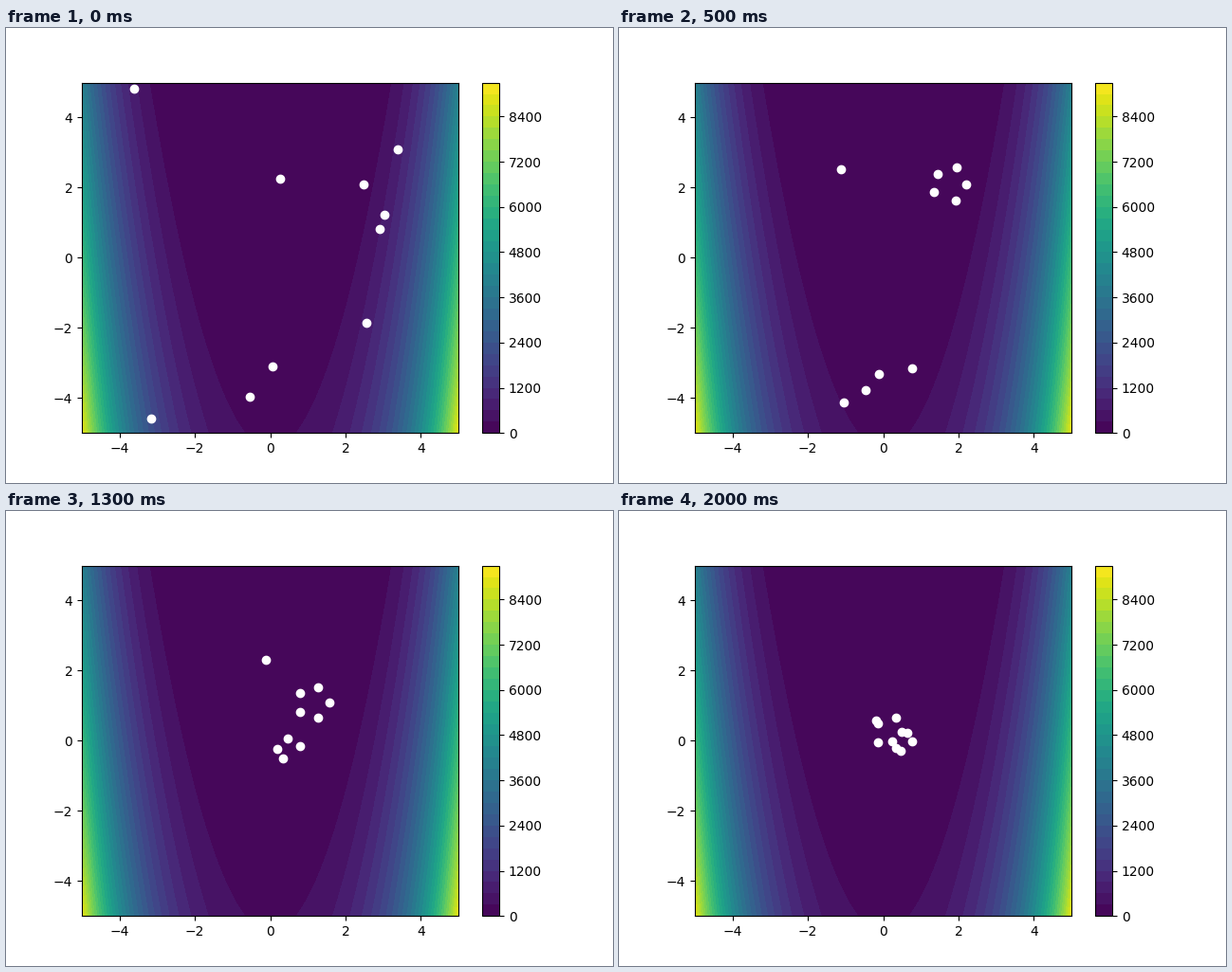
These frames come from a looping animation (640 by 480 pixels, 2.1 s). A matplotlib script:

```python
import numpy as np
import matplotlib.pyplot as plt
from matplotlib.animation import FuncAnimation
from matplotlib.transforms import IdentityTransform

FRAMES, INTERVAL = 21, 100
HEIGHT = 480
KEYS = np.array([0, 3, 7, 10, 13, 17, 20])


def glide(t, values):
    """Smooth cubic path through values at KEYS."""
    slopes = np.gradient(values, KEYS)
    k = min(np.searchsorted(KEYS, t, side="right") - 1, len(KEYS) - 2)
    h = KEYS[k + 1] - KEYS[k]
    u = (t - KEYS[k]) / h
    return ((1 + 2 * u) * (1 - u) ** 2 * values[k]
            + u * (1 - u) ** 2 * h * slopes[k]
            + u * u * (3 - 2 * u) * values[k + 1]
            + u * u * (u - 1) * h * slopes[k + 1])


class Cluster:
    """Scattered particles that contract to a ring around a moving centre."""

    def __init__(self, xs, ys, starts, radius, rate):
        self.path = np.array([xs, ys], dtype=float)
        self.spread = np.array(starts) - self.path[:, 0]
        n = len(starts)
        angle = 2 * np.pi * np.arange(1, n + 1) / n
        self.ring = radius * np.column_stack([np.cos(angle), np.sin(angle)])
        self.rate = rate

    def at(self, t):
        centre = np.array([glide(t, p) for p in self.path])
        fade = np.exp(-self.rate * t)
        return centre + self.ring + (self.spread - self.ring) * fade


upper = Cluster([374, 365, 334, 332, 324, 270, 287],
                [172, 169, 161, 166, 202, 230, 234],
                [(394, 212), (289, 159), (377, 165), (413, 128), (399, 197)],
                radius=17, rate=0.6)
lower = Cluster([268, 274, 273, 313, 296, 265, 298],
                [367, 388, 349, 297, 250, 257, 243],
                [(153, 412), (257, 389), (281, 357), (380, 311)],
                radius=10, rate=0.25)
scout = Cluster([135, 194, 274, 333, 274, 238, 271],
                [64, 120, 157, 101, 157, 198, 221],
                [(135, 64)], radius=0, rate=1)

fig, ax = plt.subplots(figsize=(6.4, 4.8), dpi=100)
axis = np.arange(-500, 500) / 100
X, Y = np.meshgrid(axis, axis)
Z = (1 - X) ** 2 + 10 * (Y - X ** 2) ** 2
field = ax.contourf(X, Y, Z, levels=np.arange(0, 9301, 300), cmap="viridis")
fig.colorbar(field, ax=ax)
dots, = ax.plot([], [], "wo", transform=IdentityTransform())
ax.set(xlim=(axis[0], axis[-1]), ylim=(axis[0], axis[-1]))


def update(i):
    x, y = np.vstack([c.at(i) for c in (upper, lower, scout)]).T
    dots.set_data(x, HEIGHT - y)
    return dots,


anim = FuncAnimation(fig, update, frames=FRAMES, interval=INTERVAL, repeat=True)
plt.show()
```
